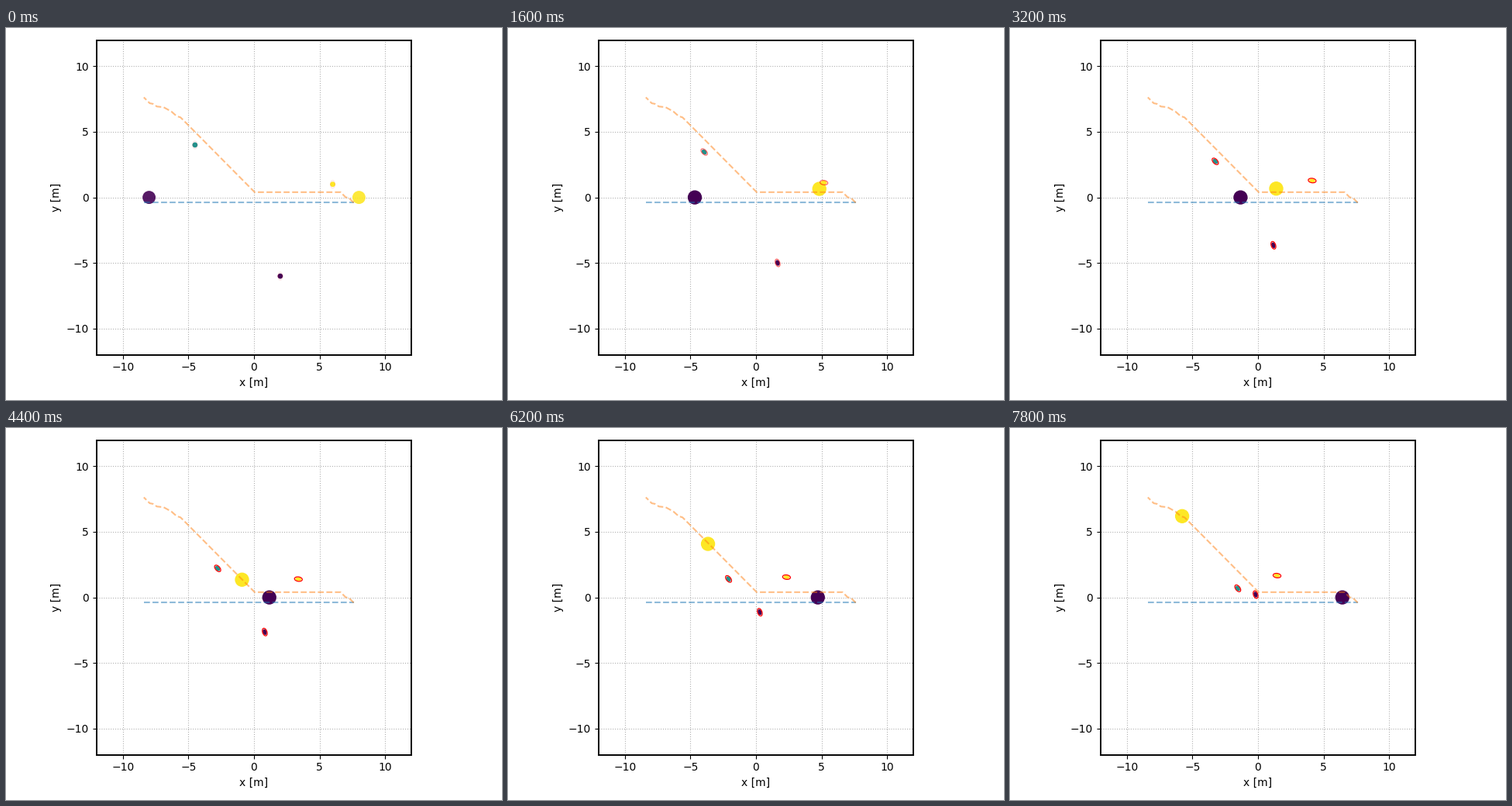
These frames come from a looping animation (640x480 px, 8 s). A matplotlib script:

```python
import numpy as np
import matplotlib.pyplot as plt
from matplotlib.animation import FuncAnimation
from matplotlib.patches import Circle, Ellipse

W, H, DPI = 640, 480, 100
FRAMES, STEP_MS = 40, 200
SIDE, BOTTOM = 406.2, 58.3
PURPLE, TEAL, YELLOW = "#440154", "#21918c", "#fde725"
RAMP = 4      # steps the walkers need to reach full speed
GAIN = 0.088  # share of the remaining way a robot covers when braking

fig = plt.figure(figsize=(W / DPI, H / DPI), dpi=DPI, facecolor="white")
ax = fig.add_axes([(W - SIDE) / 2 / W, BOTTOM / H, SIDE / W, SIDE / H])
ax.set(xlim=(-12, 12), ylim=(-12, 12), xlabel="x [m]", ylabel="y [m]")
ax.set_xticks(range(-10, 11, 5))
ax.set_yticks(range(-10, 11, 5))
ax.set_axisbelow(True)
ax.grid(linestyle=":")
for spine in ax.spines.values():
    spine.set_linewidth(1.4)

# Planned routes
ax.plot([-8.4, 7.6], [-0.4, -0.4], "--", color="tab:blue", alpha=0.5)
route = [(7.6, -0.4), (7.2, 0), (7, 0), (6.6, 0.4), (0.05, 0.4), (-5.1, 5.6),
         (-5.6, 6.1), (-5.9, 6.2), (-6.3, 6.55), (-6.9, 6.88), (-7.4, 6.93),
         (-7.7, 7.13), (-7.95, 7.18), (-8.4, 7.63)]
ax.plot(*zip(*route), "--", color="tab:orange", alpha=0.5)


class Robot:
    """Cruises along a polyline and brakes towards its end."""

    def __init__(self, color, speed, path):
        self.path = np.array(path, float)
        legs = np.hypot(*np.diff(self.path, axis=0).T)
        self.marks = np.concatenate([[0], np.cumsum(legs)])
        self.way = [0.0]
        for _ in range(FRAMES - 1):
            left = self.marks[-1] - self.way[-1]
            self.way.append(self.way[-1] + min(speed, GAIN * left))
        self.disc = ax.add_patch(Circle(path[0], 0.5, color=color, zorder=1.2))

    def update(self, k):
        self.disc.center = [np.interp(self.way[k], self.marks, c) for c in self.path.T]
        self.disc.set_alpha(1 if k else 0.9)
        self.disc.set_linewidth(1 if k else 0)
        return [self.disc]


class Walker:
    """Starts from rest, then follows a slightly bent line."""

    def __init__(self, color, start, velocity, bend=(0, 0)):
        self.start, self.velocity, self.bend = map(np.array, (start, velocity, bend))
        self.body = ax.add_patch(Ellipse(start, 0.4, 0.4, fc=color, ec="none", zorder=1.3))
        self.ring = ax.add_patch(Ellipse(start, 0.6, 0.34, fc="none", ec="red",
                                         lw=0.9, zorder=1.4))

    def update(self, k):
        t = k * k / (2 * RAMP) if k < RAMP else k - RAMP / 2
        dx, dy = self.velocity + 2 * self.bend * t
        for patch in (self.body, self.ring):
            patch.center = self.start + self.velocity * t + self.bend * t * t
            patch.angle = np.degrees(np.arctan2(dy, dx)) if k else 90
        grow = min(k / 10, 1)
        self.body.width, self.body.height = 0.4 + 0.05 * grow, 0.4 - 0.1 * grow
        self.ring.set_alpha(min(1, 0.1 + 0.06 * k))
        return [self.body, self.ring]


actors = [
    Robot(PURPLE, 0.4167, [(-8, 0), (8, 0)]),
    Robot(YELLOW, 0.43, [(8, 0), (7.37, 0.64), (-0.24, 0.68), (-7.85, 8.25)]),
    Walker(TEAL, (-4.5, 4), (0.094, -0.0894), (-0.00038, 0)),
    Walker(YELLOW, (6, 1), (-0.14, 0.022), (0.00046, -0.00011)),
    Walker(PURPLE, (2, -6), (-0.059, 0.168)),
]


def draw(k):
    return [artist for actor in actors for artist in actor.update(k)]


anim = FuncAnimation(fig, draw, frames=FRAMES, init_func=lambda: draw(0),
                     interval=STEP_MS, repeat=True, repeat_delay=0)
plt.show()
```
